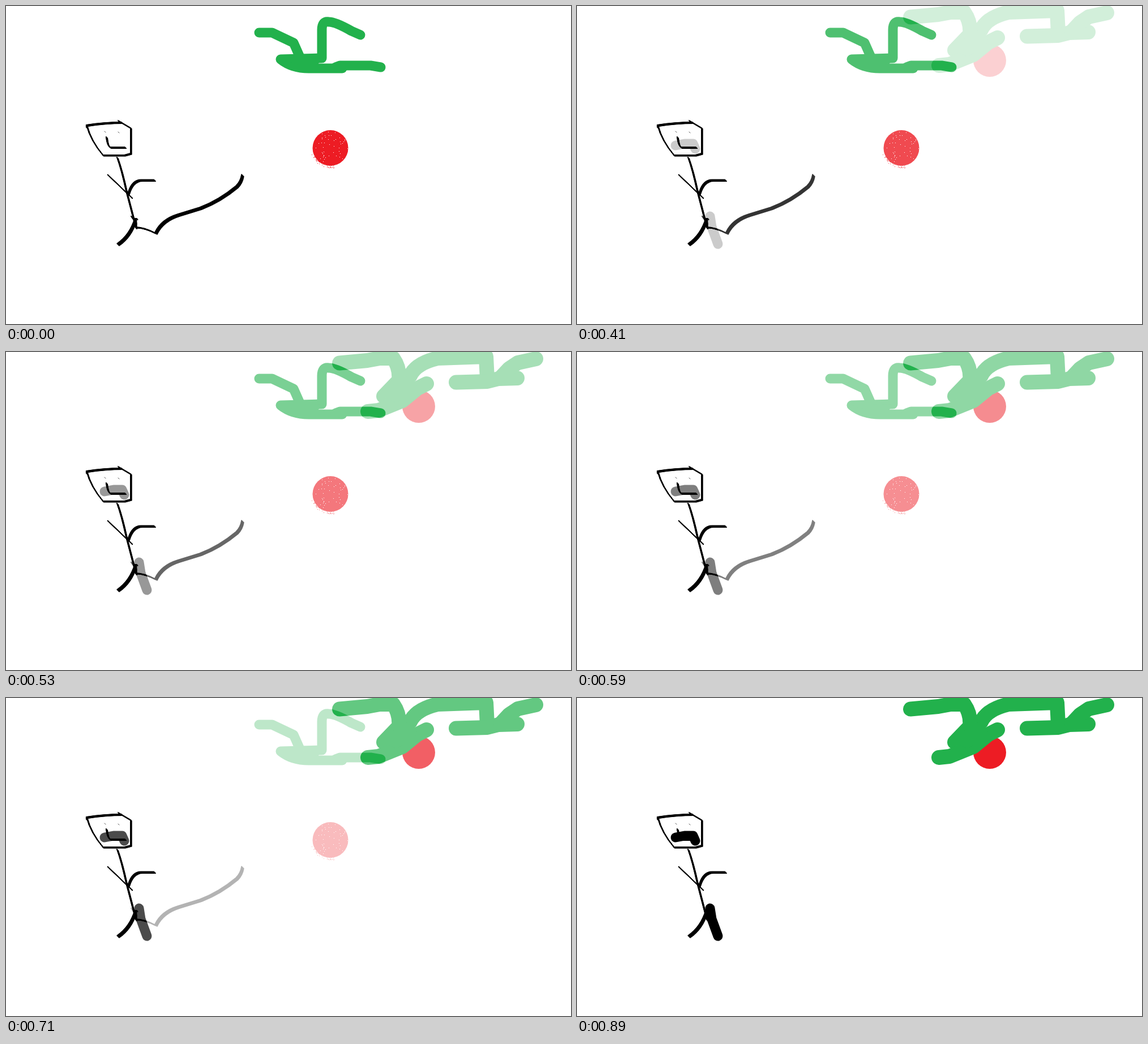
Recreate the animation shown at these times as an HTML page with a canvas. Size 998x561 px, loop 1240 ms.

```html
<!DOCTYPE html>
<html lang="en">
<head>
<meta charset="utf-8">
<style>
  html, body { margin: 0; width: 100%; height: 100%; overflow: hidden; background: #fff; }
  canvas { position: absolute; left: 0; top: 0; }
</style>
</head>
<body>
<canvas id="before" width="998" height="561"></canvas>
<canvas id="after" width="998" height="561"></canvas>
<script>
const GREEN = '#22b14c', RED = '#ed1c24', BLACK = '#000';
const LOOP = 1240, HOLD = 350, STEP = 60, STEPS = 10;

function openScene(id) {
  const ctx = document.getElementById(id).getContext('2d');
  ctx.fillStyle = '#fff';
  ctx.fillRect(0, 0, 998, 561);
  ctx.lineCap = ctx.lineJoin = 'round';
  return ctx;
}

function brush(ctx, color, width, path) {
  ctx.strokeStyle = color;
  ctx.lineWidth = width;
  ctx.stroke(new Path2D(path));
}

function area(ctx, color, path) {
  ctx.fillStyle = color;
  ctx.fill(new Path2D(path));
}

function disc(ctx, color, x, y, r) {
  ctx.fillStyle = color;
  ctx.beginPath();
  ctx.arc(x, y, r, 0, Math.PI * 2);
  ctx.fill();
}

// Calligraphy pen: repeats the stroke along a short "\" shaped nib.
function pen(ctx, nib, path) {
  for (let offset = -nib; offset <= nib; offset += nib / 4) {
    ctx.save();
    ctx.translate(offset, offset);
    brush(ctx, BLACK, 1.4, path);
    ctx.restore();
  }
}

function figure(ctx) {
  pen(ctx, 1.4, 'M143 215V211Q175 206 205 206');                     // head
  pen(ctx, 1.2, 'M199 203L221 216V261L210 264H172Q150 238 143 211');
  brush(ctx, '#555', 1, 'M174 221l2 2M198 222l2 2');                 // eyes
  pen(ctx, 1.4, 'M178 232Q180 250 186 250H211');                     // smile
  pen(ctx, 1.4, 'M197 268Q205 290 213 327L230 392');                 // body
  pen(ctx, 0.6, 'M180 298L223 339');                                 // arms
  pen(ctx, 1.7, 'M217 331Q224 308 240 308H263');
  pen(ctx, 2, 'M229 377Q220 406 198 421');                           // leg
}

function speckle(ctx, x, y) {
  let seed = 7;
  const random = () => (seed = seed * 16807 % 2147483647) / 2147483647;
  const dot = (color, angle, radius) => {
    ctx.fillStyle = color;
    ctx.fillRect(Math.round(x + radius * Math.cos(angle)),
                 Math.round(y + radius * Math.sin(angle)), 1, 1);
  };
  for (let i = 0; i < 45; i++) dot('#fff', random() * 6.283, 31 * Math.sqrt(random()));
  for (let i = 0; i < 32; i++) dot(RED, 1.4 + random() * 1.4, 31 + random() * 4);
}

function drawBefore() {
  const ctx = openScene('before');
  figure(ctx);
  pen(ctx, 1.2, 'M222 372L229 382M227 376H232');
  pen(ctx, 1.2, 'M230 381V391Q244 391 264 401');
  pen(ctx, 2, 'M265 401Q276 378 305 369L344 357Q378 344 408 319Q416 311 418 299');
  brush(ctx, GREEN, 17, 'M447 47H470L508 65L520 92');
  brush(ctx, GREEN, 17,
    'M626 51L610 44Q582 28 570 28Q558 26 558 42V92L485 94Q505 110 535 110H594');
  brush(ctx, GREEN, 17, 'M582 108L590 105H644L662 108');
  area(ctx, GREEN, 'M485 94L558 92L548 108H530Z');
  disc(ctx, RED, 573, 250.5, 31.5);
  speckle(ctx, 573, 250.5);
}

function drawAfter() {
  const ctx = openScene('after');
  figure(ctx);
  brush(ctx, BLACK, 17, 'M174 246L190 243H205L209 252');
  brush(ctx, BLACK, 17, 'M235 371L238 390L249 420');
  disc(ctx, RED, 729, 96, 29);
  brush(ctx, GREEN, 26,
    'M589 19.5L638 15L660 11H684Q696 28 694 50L667 78L714 42Q724 20 762 11L848 8L850 48');
  brush(ctx, GREEN, 26, 'M639 105L658 103L700 86L727 64L743 56');
  brush(ctx, GREEN, 26, 'M795 53.5L850 52L870 47L903 46');
  brush(ctx, GREEN, 26, 'M874 45L889 29L904 19L936 12');
  area(ctx, GREEN, 'M667 78L695 45L716 42L728 64L690 90Z');
}

drawBefore();
drawAfter();
const after = document.getElementById('after');
const start = performance.now();

function frame() {
  const t = (performance.now() - start) % LOOP;
  const step = Math.floor((t - HOLD) / STEP) + 1;
  after.style.opacity = Math.min(Math.max(step, 0), STEPS) / STEPS;
  requestAnimationFrame(frame);
}
frame();
</script>
</body>
</html>
```
